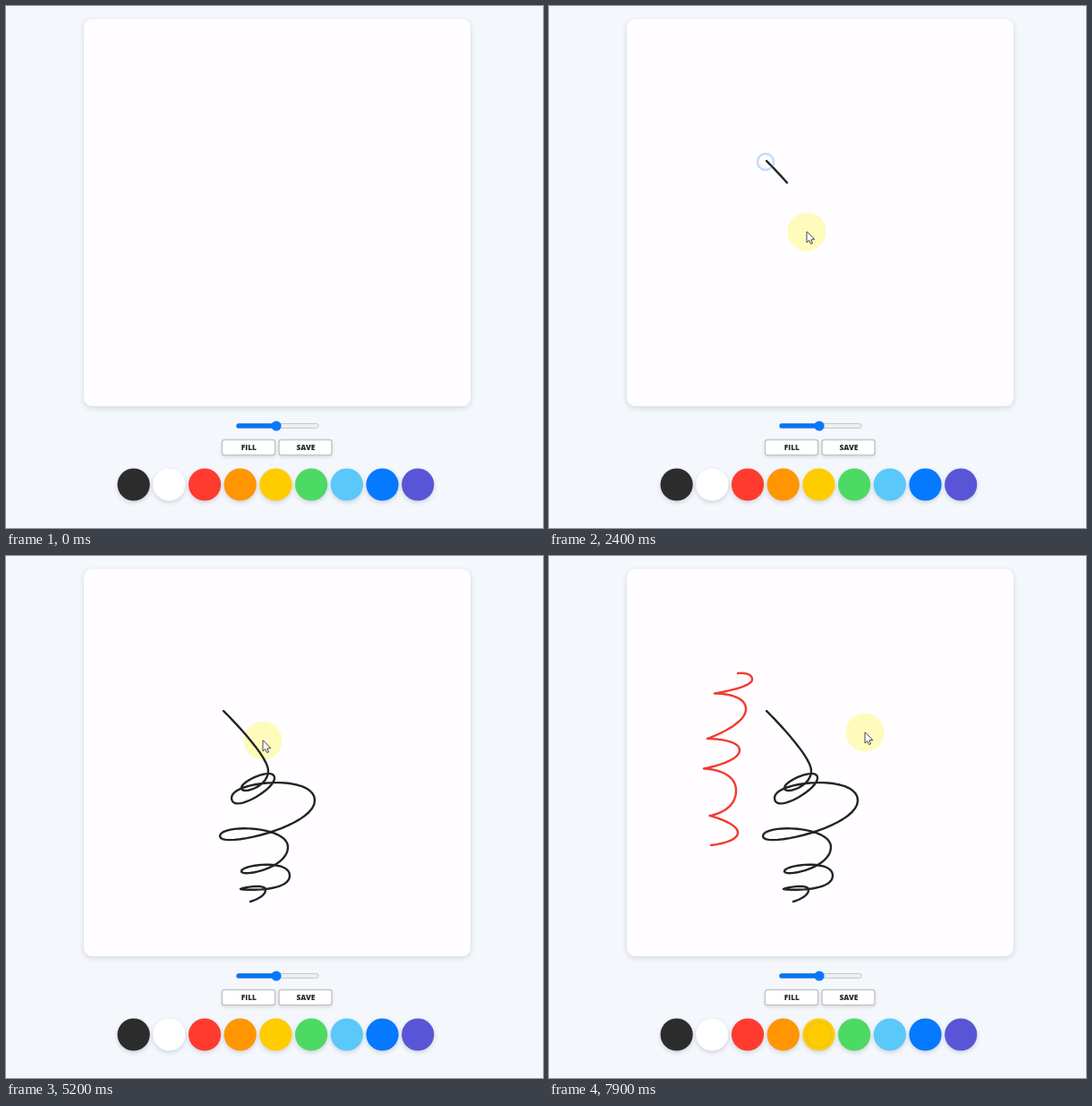
An HTML page with a canvas that plays this animation: 600 px wide and 583 px high, repeating every 8000 ms.

```html
<!DOCTYPE html>
<html lang="en">
<head>
<meta charset="utf-8">
<title>Paint board</title>
<style>
html, body { margin: 0; width: 100%; height: 100%; overflow: hidden; background: #f4f8fd; }
canvas { display: block; width: 600px; height: 583px; }
</style>
</head>
<body>
<canvas id="stage"></canvas>
<script>
const LOOP = 8000, STEP = 100, LAG = 200;
const canvas = document.getElementById('stage');
const ctx = canvas.getContext('2d');
const dpr = window.devicePixelRatio || 1;
canvas.width = Math.round(600 * dpr);
canvas.height = Math.round(583 * dpr);

const COLORS = ['#2c2c2c', '#ffffff', '#ff3b30', '#ff9500', '#ffcc00',
  '#4cd964', '#5ac8fa', '#0579ff', '#5856d6'];
const RED = 2, YELLOW = 4;
const swatch = i => [142.6 + i * 39.7, 534.5];

// turns: side-to-side turning points [x, y, vertical pull], joined by Bezier arcs
// pace: [time, turns passed]
const STROKES = [
  {
    color: '#242426',
    turns: [[243,173,0], [293,240,18], [263,259,-8], [300,248,13], [252,270,-19],
      [345,273,30], [239,313,-14], [315,325,24], [263,352,-7], [317,357,19],
      [262,372,-1], [290,373,8], [273,386,0]],
    pace: [[2080, 0], [2400, 1.26], [3400, 4.6], [3780, 12]]
  },
  {
    color: '#f23a30',
    turns: [[211,131,0], [227,138,9], [185,153.5,0], [220,171,18], [177,204,0],
      [213,217,13], [173,237.5,0], [209,262,24], [179.5,290,0], [211,309,11],
      [181,323,0]],
    pace: [[5740, 0], [6000, 2], [6200, 2.87], [6900, 10]]
  }
];

// pointer travel while not drawing: [time, x, y]
const STOPS = [
  [600, 235, -30], [1200, 204, 214], [1900, 243, 173], [2080, 243, 173],
  [3780, 273, 386], [4000, 219, 413], [4400, ...swatch(RED)], [4650, ...swatch(RED)],
  [5200, 287, 206], [5740, 211, 131],
  [6900, 181, 323], [7350, ...swatch(YELLOW)], [7550, ...swatch(YELLOW)], [7900, 353, 197]
];

const CLICKS = [[2080, 242, 174], [4480, ...swatch(RED)],
  [5740, 219, 131], [7400, ...swatch(YELLOW)]];

const mix = (a, b, k) => a + (b - a) * k;

// linear interpolation of rows [time, ...values]
function track(rows, t) {
  const next = rows.findIndex(r => r[0] >= t);
  if (next === 0) return rows[0].slice(1);
  if (next < 0) return rows[rows.length - 1].slice(1);
  const a = rows[next - 1], b = rows[next];
  const k = (t - a[0]) / (b[0] - a[0]);
  return a.slice(1).map((v, i) => mix(v, b[i + 1], k));
}

function bezier(a, b, c, d, t) {
  const s = 1 - t;
  return s * s * s * a + 3 * s * s * t * b + 3 * s * t * t * c + t * t * t * d;
}

function strokeAt(turns, u) {
  const i = Math.min(Math.floor(u), turns.length - 2);
  const [x0, y0, p0] = turns[i], [x1, y1, p1] = turns[i + 1];
  return [bezier(x0, x0, x1, x1, u - i), bezier(y0, y0 + p0, y1 - p1, y1, u - i)];
}

function disc(x, y, r, fill) {
  ctx.beginPath();
  ctx.arc(x, y, r, 0, Math.PI * 2);
  ctx.fillStyle = fill;
  ctx.fill();
}

function box(x, y, w, h, r, fill, border) {
  ctx.beginPath();
  ctx.roundRect(x, y, w, h, r);
  ctx.fillStyle = fill;
  ctx.fill();
  if (border) {
    ctx.strokeStyle = border;
    ctx.stroke();
  }
}

function shadowed(alpha, blur, draw) {
  ctx.save();
  ctx.shadowColor = `rgba(35,40,60,${alpha})`;
  ctx.shadowBlur = blur * dpr;
  ctx.shadowOffsetY = 2 * dpr;
  draw();
  ctx.restore();
}

function button(x, label) {
  shadowed(0.16, 4, () => box(x, 484.5, 59, 17, 2.5, '#fff'));
  ctx.lineWidth = 1.5;
  box(x, 484.5, 59, 17, 2.5, '#fff', '#c6c6c8');
  ctx.fillStyle = '#2c2c2c';
  ctx.font = '800 8.4px "Open Sans", sans-serif';
  ctx.textAlign = 'center';
  ctx.fillText(label, x + 29.9, 496.3);
}

function drawPage() {
  ctx.fillStyle = '#f4f8fd';
  ctx.fillRect(0, 0, 600, 583);
  shadowed(0.16, 6, () => box(87, 14.5, 432, 432.5, 9, '#fffdff'));

  ctx.lineWidth = 0.7;
  box(257.6, 466.4, 91.6, 5, 2.5, '#efefef', '#b4b4b6');
  box(257.4, 466.2, 46, 5.4, 2.7, '#0674f0');
  disc(302, 469, 5.6, '#0579ff');

  button(241.5, 'FILL');
  button(305, 'SAVE');
  COLORS.forEach((c, i) => shadowed(0.18, 5, () => disc(...swatch(i), 18.1, c)));
}

function drawStroke({ color, turns, pace }, t) {
  if (t < pace[0][0]) return;
  const [end] = track(pace, t);
  ctx.strokeStyle = color;
  ctx.lineWidth = 2.4;
  ctx.lineCap = ctx.lineJoin = 'round';
  ctx.beginPath();
  for (let u = 0; u < end; u += 0.05) ctx.lineTo(...strokeAt(turns, u));
  ctx.lineTo(...strokeAt(turns, end));
  ctx.stroke();
}

function drawRipple([start, x, y], t) {
  const age = (t - start) / 560;
  if (age < 0 || age > 1) return;
  ctx.beginPath();
  ctx.arc(x, y, 15.7 * age, 0, Math.PI * 2);
  ctx.lineWidth = 2.6;
  ctx.strokeStyle = `rgba(40,140,235,${0.65 * (1 - age)})`;
  ctx.stroke();
}

function pointerAt(t) {
  const active = STROKES.find(({ pace }) => t >= pace[0][0] && t <= pace[pace.length - 1][0]);
  return active ? strokeAt(active.turns, track(active.pace, t)[0]) : track(STOPS, t);
}

function drawPointer(x, y) {
  ctx.save();
  ctx.globalCompositeOperation = 'multiply';
  disc(x, y, 21.5, '#fefdbd');
  ctx.restore();
  ctx.save();
  ctx.translate(x, y);
  ctx.beginPath();
  [[0, 0], [0, 12], [2.7, 9.6], [4.6, 13.6], [6.5, 12.8], [4.8, 8.9], [8.3, 8.5]]
    .forEach(p => ctx.lineTo(...p));
  ctx.closePath();
  ctx.fillStyle = '#fff';
  ctx.fill();
  ctx.lineWidth = 0.9;
  ctx.strokeStyle = '#333';
  ctx.stroke();
  ctx.restore();
}

function frame(now) {
  const t = Math.floor((now % LOOP) / STEP) * STEP;
  ctx.setTransform(dpr, 0, 0, dpr, 0, 0);
  drawPage();
  STROKES.forEach(s => drawStroke(s, t - LAG));
  CLICKS.forEach(c => drawRipple(c, t));
  drawPointer(...pointerAt(t));
}

let origin = null;
function tick(now) {
  if (origin === null) origin = now;
  frame(now - origin);
  requestAnimationFrame(tick);
}
frame(0);
requestAnimationFrame(tick);
</script>
</body>
</html>
```
